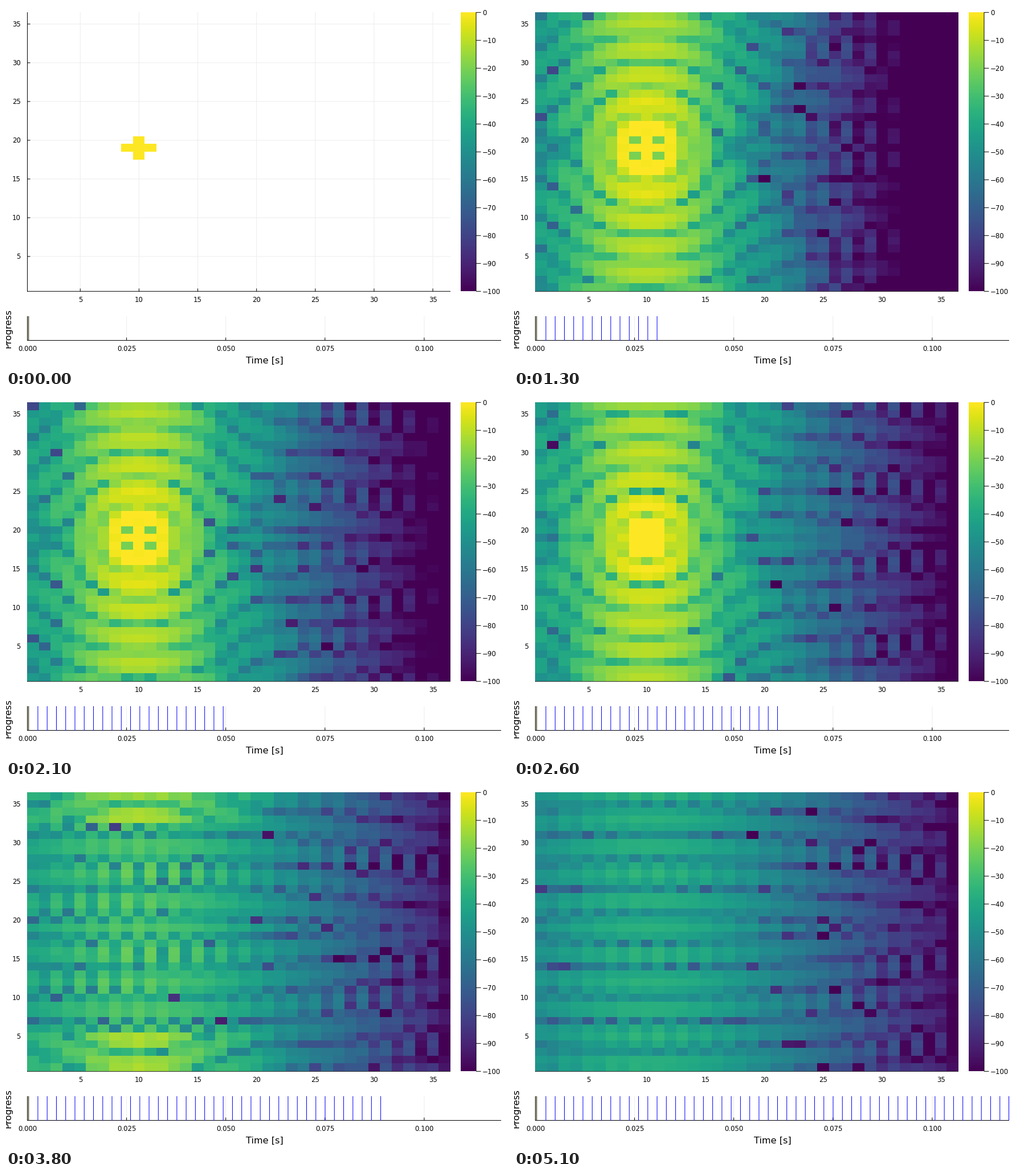
Write a matplotlib script that moves like this. It is 881 px wide and 636 px high and loops after 5200 ms.

```python
import numpy as np
import matplotlib.pyplot as plt
from matplotlib.animation import FuncAnimation

W, H, DPI = 881, 636, 100
N, FRAMES = 36, 52
LEFT, RIGHT, TOP, BOTTOM = 37, 780, 11, 501
BAR_L, BAR_R = 798, 825
TIME_TOP, TIME_BOTTOM, TIME_END = 545, 587.5, 869
PX_PER_S = 6964
MARK_0, MARK_STEP = 39.7, 16.26
SOURCE_X, SOURCE_Y = 10, 19
SOURCE_OFF = 35.25
KAPPA = 0.935
TICK_PX, LABEL_PX = 11.7, 16.1

xs, ys = np.meshgrid(np.arange(1, N + 1), np.arange(1, N + 1))
dx, dy = xs - SOURCE_X, ys - SOURCE_Y
ax_, ay = np.abs(dx), np.abs(dy)
radius = np.sqrt(dy**2 + 1.5 * dx**2)
parity = (-1.0) ** xs
plus = ax_ + ay <= 1


def amp(db):
    return 10.0 ** (db / 20)


def falloff(slope, knee):
    """Decay in dB along x: round near the source, straight far away."""
    return slope * (np.hypot(dx, knee) - knee)


def driven_wave(k):
    """Rings leaving the source while it sounds, strongest along y."""
    level = 26 * np.exp(-radius / 5) - 12
    level = level - falloff(7, 3 + 5 * (1 - np.exp(-ay / 8)))
    lag = 0.92 + 0.88 * np.exp(-(radius / 2.5) ** 2)
    wave = amp(level) * np.cos(KAPPA * radius - lag - np.pi / 2 * k)
    alive = (ay >= 5 * (k - SOURCE_OFF)) & (ay <= 1 + 6 * k)
    return np.where(alive, wave, 0)


def ringing(k):
    """Slow residue that creeps sideways and alternates between columns."""
    level = -27 - max(0, k - 42) - falloff(2.7 + 5 * np.exp(-k / 16), 8)
    front = min(2.3 * k, 13.6 + 0.6 * k)
    level = level - 9 * np.clip(ax_ - front - 0.5, 0, None)
    level = level - 5 * (xs == N)

    mix = np.exp(-((k - 43) / 3) ** 2)
    linear = 0.9 * ay - np.pi / 2 * (k - 51)
    chirp = np.pi * (ys - 18.4) ** 2 / 85 - np.pi / 2
    rows = np.cos((1 - mix) * linear + mix * chirp + 0.004 * dx**2 * (1 - mix))

    edge = min(26, 18.5 + 0.4 * k)
    share = 0.2 + 0.5 / (1 + np.exp(-(xs - edge) / 1.5))
    share = share + 0.5 * np.exp(-((k - 38) / 3) ** 2) * np.exp(-(dx / 8) ** 2)
    columns = share * parity * np.cos(0.3 * dy + 0.15 * dx + k)
    return amp(level) * (rows * (1 - 0.5 * share * parity) + 0.8 * columns)


def field(k):
    if k == 0:
        return np.where(plus, 0.0, np.nan)
    total = np.abs(driven_wave(k) + ringing(k))
    db = np.clip(20 * np.log10(total + 1e-9), -100, 0)
    if k < SOURCE_OFF:
        db[plus] = 0
    reached = (ax_ <= np.ceil(1 + 3.5 * k)) & (ay <= 1 + 7 * k)
    return np.where(reached, db, np.nan)


plt.rcParams["font.family"] = "DejaVu Sans"
fig = plt.figure(figsize=(W / DPI, H / DPI), dpi=DPI, facecolor="white")
ax = fig.add_axes([0, 0, 1, 1])
ax.axis("off")


def line(x0, y0, x1, y1, color="black", z=2):
    return ax.plot([x0, x1], [y0, y1], color=color, lw=0.72, zorder=z,
                   solid_capstyle="butt", snap=False)[0]


def text(x, y, s, px=TICK_PX, ha="center", **kw):
    ax.text(x, y, s, fontsize=px * 72 / DPI, ha=ha, va="baseline", **kw)


def col(v):
    return 37.5 + (v - 0.5) * 742.5 / N


def row(v):
    return 501.3 - (v - 0.5) * 490 / N


# Main chart
GRID = "#ededed"
for v in range(5, 36, 5):
    x, y = col(v), row(v)
    line(x, TOP, x, BOTTOM, GRID, 1)
    line(LEFT, y, RIGHT, y, GRID, 1)
    line(x, 501.3, x, 496.3)
    line(37.5, y, 42.5, y)
    text(x, 519.5, str(v))
    text(25.5, y + 4.3, str(v), ha="right")
line(37.5, TOP, 37.5, 502)
line(LEFT, 501.3, RIGHT, 501.3)

heat = ax.imshow(field(0), cmap="viridis", vmin=-100, vmax=0, origin="lower",
                 extent=(LEFT, RIGHT, BOTTOM, TOP), aspect="auto",
                 interpolation="nearest", zorder=4)

# Colour bar
ax.imshow(np.linspace(0, 1, 256)[:, None], cmap="viridis", origin="lower",
          extent=(BAR_L, BAR_R, BOTTOM, TOP), aspect="auto",
          interpolation="nearest", zorder=2)
line(BAR_R, TOP, BAR_R, BOTTOM, z=3)
for i in range(11):
    y = 11.3 + 49 * i
    line(BAR_R, y, 833.5, y, z=3)
    text(836, y + 4.3, f"\N{MINUS SIGN}{10 * i}" if i else "0", ha="left")

# Time strip
for i in range(5):
    t = 0.025 * i
    x = 37.5 + t * PX_PER_S
    if i:
        line(x, TIME_TOP, x, TIME_BOTTOM, GRID, 1)
    line(x, TIME_BOTTOM, x, TIME_BOTTOM - 5)
    text(x, 605.5, f"{t:.3f}")
line(37.5, TIME_TOP, 37.5, 588)
line(37, TIME_BOTTOM, TIME_END, TIME_BOTTOM)
line(38.5, TIME_TOP, 38.5, 587, "#f2ecb0")
line(MARK_0, TIME_TOP, MARK_0, 588)
text(453.5, 627.5, "Time [s]", LABEL_PX)
text(8, 566.5, "Progress", LABEL_PX, rotation=90, rotation_mode="anchor")

marks = []
for k in range(1, FRAMES):
    x = min(MARK_0 + MARK_STEP * k, TIME_END - 0.5)
    marks.append(line(x, TIME_TOP, x, 588, "blue", 3))

ax.set_xlim(0, W)
ax.set_ylim(H, 0)


def update(k):
    heat.set_data(np.ma.masked_invalid(field(k)))
    for i, mark in enumerate(marks, 1):
        mark.set_visible(i <= k)
    return [heat, *marks]


anim = FuncAnimation(fig, update, frames=FRAMES, interval=100,
                     repeat=True, repeat_delay=0, blit=False)
plt.show()
```
